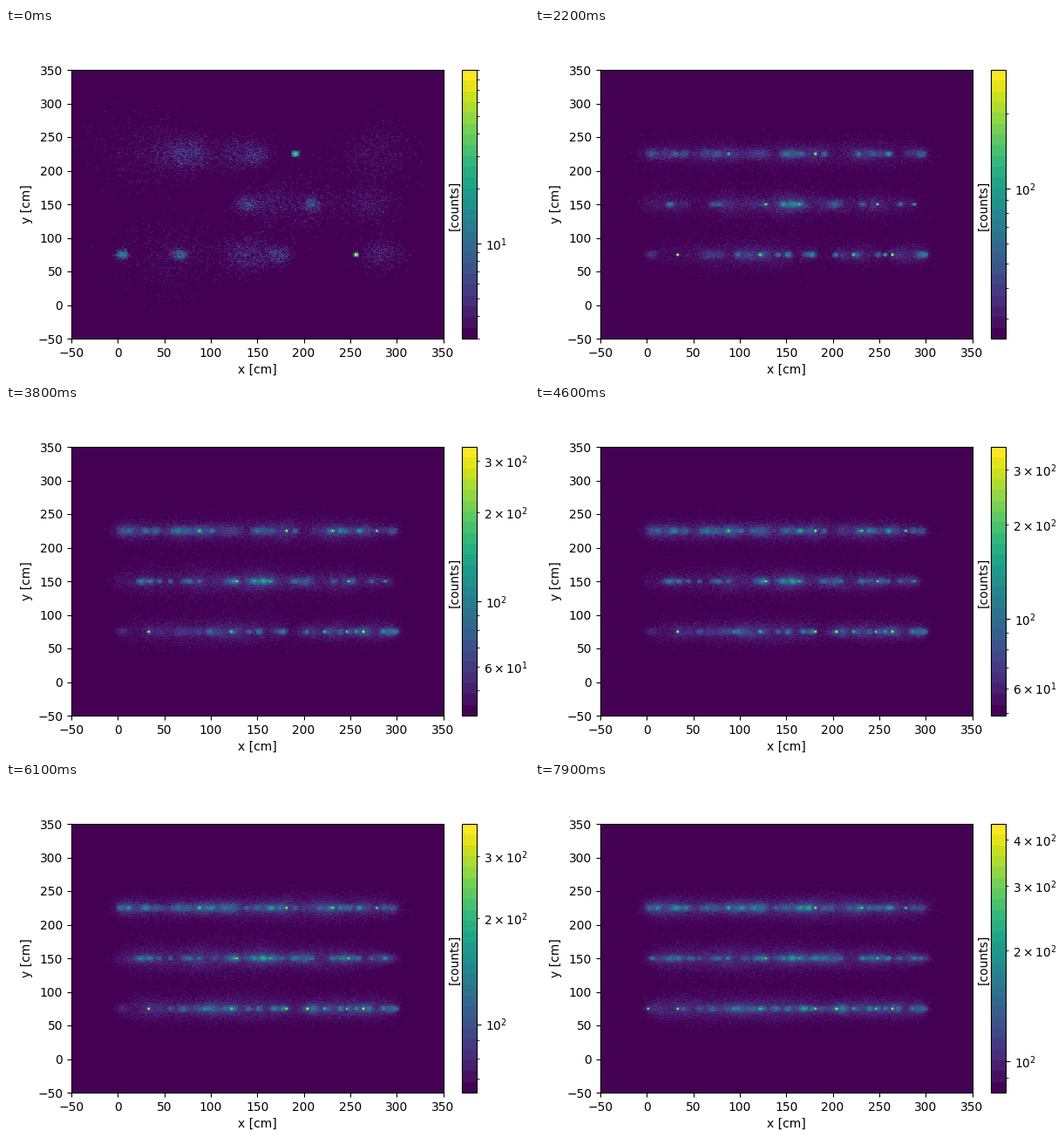
These frames come from a looping animation (600x400 px, 8 s). A matplotlib script:

```python
import numpy as np
import matplotlib.pyplot as plt
from matplotlib.animation import FuncAnimation
from matplotlib.colors import LogNorm

FRAMES = 80
BINS = 300
LOW, HIGH = -50, 350
ROWS = [75, 150, 225]
HITS = 480      # hits in one cloud
CLOUDS = 11     # new clouds per frame
BASE = 3        # every step lifts all bins by one count

# first clouds: x, y, spread
OPENING = [
    (5, 75, 3.5), (66, 75, 4.5), (172, 75, 7), (191, 225, 1.9), (148, 225, 9),
    (60, 225, 16), (138, 150, 7), (208, 150, 6), (270, 150, 15),
]

# brightest points: row -> (x, frame of appearance)
SPARKS = {
    75: [(256, 0), (222, 5), (122, 8), (33, 17), (264, 18), (246, 30),
         (181, 42), (204, 44), (1, 68)],
    150: [(287, 6), (164, 8), (128, 17), (248, 20)],
    225: [(88, 6), (181, 17), (231, 30), (278, 32)],
}

rng = np.random.default_rng(12)


def peak(n):
    """Highest bin content above the base level; it jumps at new sparks."""
    frames = [0, 4, 5, 15, 16, 28, 46, 67, 68, 79]
    return np.interp(n, frames, [87, 87, 109, 113, 270, 278, 306, 306, 352, 360])


def new_clouds(n):
    """The x, y and spread of all clouds that appear at step n."""
    narrow = 12 if n == 0 else 1.6
    spread = narrow + (28 - narrow) * rng.random(CLOUDS) ** 1.5
    x = rng.uniform(0, 300, CLOUDS)
    clouds = list(zip(x, rng.choice(ROWS, CLOUDS), spread))
    if n == 0:
        clouds += OPENING
    area = ((HIGH - LOW) / BINS) ** 2
    sharp = np.sqrt(HITS * area / (2 * np.pi * peak(n)))
    for row, sparks in SPARKS.items():
        clouds += [(x, row, sharp * rng.uniform(0.75, 1))
                   for x, birth in sparks if birth == n]
    return np.array(clouds).T


def step_counts(n):
    x, y, spread = np.repeat(new_clouds(n), HITS, axis=1)
    span = [[LOW, HIGH], [LOW, HIGH]]
    return np.histogram2d(rng.normal(y, spread), rng.normal(x, spread),
                          bins=BINS, range=span)[0]


counts = np.cumsum([step_counts(n) for n in range(FRAMES)], axis=0)


def levels(n):
    low = n + BASE
    return np.minimum(counts[n], peak(n)) + low, low, low + peak(n)


fig = plt.figure(figsize=(6, 4), dpi=100)
ax = fig.add_axes([75 / 600, 0.11, 426.5 / 600, 0.77])
cax = fig.add_axes([523 / 600, 0.11, 17 / 600, 0.77])

data, low, high = levels(0)
image = ax.imshow(
    data, origin="lower", extent=[LOW, HIGH, LOW, HIGH], aspect="auto",
    interpolation="nearest", cmap=plt.get_cmap("viridis", 25),
    norm=LogNorm(low, high),
)
ax.set(xlabel="x [cm]", ylabel="y [cm]",
       xticks=range(LOW, HIGH + 1, 50), yticks=range(LOW, HIGH + 1, 50))
fig.colorbar(image, cax=cax)
fig.text(515 / 600, 1 - 203.5 / 400, "[counts]", rotation=90,
         ha="center", va="center")


def update(n):
    data, low, high = levels(n)
    image.set_data(data)
    image.set_clim(low, high)
    return [image]


anim = FuncAnimation(fig, update, frames=FRAMES, interval=100, repeat=True)
plt.show()
```
